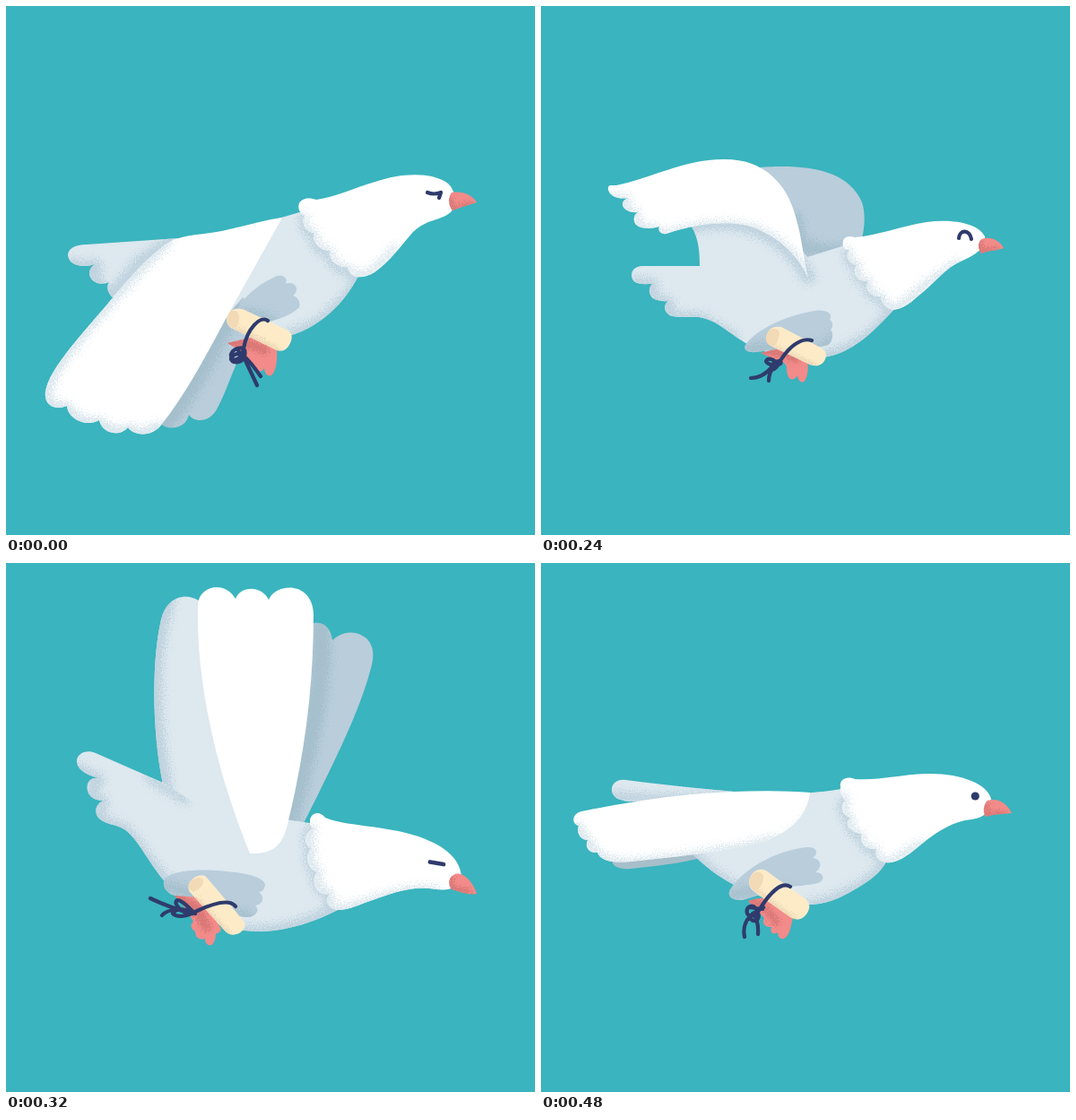
An HTML page that plays this animation: 590x590 px, repeating every 560 ms.

```html
<!DOCTYPE html>
<html lang="en">
<head>
<meta charset="utf-8">
<title>Flying dove</title>
<style>
html, body { margin: 0; width: 100%; height: 100%; overflow: hidden; background: #3ab4be; }
svg { position: absolute; left: 0; top: 0; width: 100%; height: 100%; }
.pose { opacity: 0; will-change: opacity; }
</style>
</head>
<body>
<svg width="590" height="590" aria-hidden="true">
  <defs>
    <!-- soft airbrush edge broken up into fine speckles -->
    <filter id="spray" x="-.15" y="-.15" width="1.3" height="1.3" color-interpolation-filters="sRGB">
      <feGaussianBlur in="SourceGraphic" stdDeviation="3.2" result="soft"/>
      <feTurbulence type="fractalNoise" baseFrequency=".7" numOctaves="1" seed="4" result="noise"/>
      <feDisplacementMap in="soft" in2="noise" scale="28" xChannelSelector="R" yChannelSelector="G"/>
    </filter>
    <filter id="fine" x="-.2" y="-.2" width="1.4" height="1.4" color-interpolation-filters="sRGB">
      <feGaussianBlur in="SourceGraphic" stdDeviation="1.8" result="soft"/>
      <feTurbulence type="fractalNoise" baseFrequency=".7" numOctaves="1" seed="9" result="noise"/>
      <feDisplacementMap in="soft" in2="noise" scale="18" xChannelSelector="R" yChannelSelector="G"/>
    </filter>
  </defs>
</svg>
<script>
const WHITE = '#fff', PALE = '#dde8ef', GREY = '#b9cddb', RED = '#f28b89',
      CREAM = '#fdebc8', CURL = '#f1dab5', NAVY = '#2f3b6c';
const SHADE = { [WHITE]: '#d8e5ec', [PALE]: '#bfd2de', [GREY]: '#a5bfcc', [RED]: '#d97877', [CREAM]: '#edd8b5' };

let clips = 0;

// A filled shape; each shade is [width, path], sprayed inside the outline.
function part(fill, d, ...shades) {
  const body = `<path d="${d}" fill="${fill}"/>`;
  if (!shades.length) return body;
  const id = 'c' + clips++;
  const spray = fill === RED || fill === CREAM ? 'fine' : 'spray';
  const strokes = shades.map(([w, s]) => `<path d="${s}" stroke-width="${w}"/>`).join('');
  return `${body}<clipPath id="${id}"><path d="${d}"/></clipPath>
    <g clip-path="url(#${id})"><g filter="url(#${spray})" fill="none" stroke="${SHADE[fill]}" stroke-linecap="round">
    <path d="${d}" stroke="none"/>${strokes}</g></g>`;
}

const line = (d, w = 4.2) =>
  `<path d="${d}" fill="none" stroke="${NAVY}" stroke-width="${w}" stroke-linecap="round" stroke-linejoin="round"/>`;

const dive = [
  part(PALE, 'M192 259L90 266C76 266 69 271 69 278C70 288 82 293 100 288C91 292 91 302 98 307C104 311 110 310 115 308C111 313 114 321 119 325L150 310Z',
    [14, 'M72 288Q90 294 104 288Q92 300 104 311L116 326L150 285L185 262']),
  part(PALE, 'M300 238L345 225L398 290C380 334 345 361 312 369L240 380L230 350Z',
    [14, 'M396 302C375 340 345 364 300 372'], [10, 'M333 234C330 250 340 255 345 254C340 270 355 276 361 274C360 290 375 293 386 300']),
  part(GREY, 'M264 325L290 345L264 384C254 403 245 432 236 448C228 465 210 465 204 456C201 470 184 474 174 467L200 400Z',
    [26, 'M250 340C228 380 203 430 174 466']),
  part(GREY, 'M256 342C265 322 285 309 300 302C309 298 316 305 311 310C322 306 329 316 320 323C328 326 329 334 326 337C318 345 302 350 290 353L252 352Z',
    [10, 'M255 345Q275 338 300 354']),
  part(RED, 'M247 376L280 368L302 381C303 396 301 408 296 412C291 414 288 408 288 404C284 410 279 408 278 403C270 402 269 394 264 386Z',
    [10, 'M247 376Q272 374 288 384']),
  part(CREAM, 'M264 338L313 361C320 364 320 371 316 378C312 385 306 386 300 383L253 360C246 357 245 350 247 345C249 339 256 336 264 338Z',
    [6, 'M258 361L302 383']),
  part(CURL, 'M249 341C254 338 261 340 260 349C259 357 256 361 252 359C245 355 245 346 249 341Z'),
  line('M292 351C284 345 269 359 265 382C263 392 257 396 253 394C248 389 253 383 259 382C264 380 268 383 266 390C263 400 253 398 251 394C251 389 260 386 264 389L280 423M258 382L264 394M264 389Q273 397 284 413'),
  part(WHITE, 'M308 236C285 239 255 249 228 253C213 255 201 256 189 260C170 267 140 300 111 335C82 369 48 405 44 430C42 446 55 451 68 446C69 461 90 470 104 462C107 477 127 481 136 470C143 480 164 481 174 466C203 430 228 380 250 340Z',
    [11, 'M180 262C145 295 112 334 90 360C65 390 44 415 45 442'], [13, 'M45 445L68 449Q80 468 104 465Q118 480 137 473Q154 482 170 470']),
  part(WHITE, 'M327 220C331 213 340 214 346 216C368 213 390 202 412 196C442 186 475 185 493 198C502 206 503 222 496 230C484 240 470 237 454 252C441 267 427 286 411 297C400 304 384 306 381 291C371 292 360 285 361 273C350 273 340 262 344 253C333 252 329 241 333 234C327 231 325 225 327 220Z',
    [8, 'M333 234Q330 250 344 254Q344 271 361 274Q363 290 380 292Q390 304 408 297L435 270']),
  part(RED, 'M497 208C510 206 520 211 525 219C517 222 507 224 498 228C493 223 493 213 497 208Z', [6, 'M496 216L498 228Q508 223 518 221']),
  line('M470 208Q477 211 485 208L483 214')
];

const glide = [
  part(PALE, 'M240 257C190 253 140 248 95 242C83 240 78 248 79 254C80 262 88 265 98 266L240 266Z',
    [12, 'M82 260Q130 268 230 258']),
  part('#a7bfca', 'M79 331C79 339 88 342 100 341C130 338 160 334 178 329L170 318L80 329Z'),
  part(PALE, 'M290 257C320 255 335 252 348 250L390 320C386 340 370 353 350 364C330 376 315 381 298 381C265 382 205 365 165 320Z',
    [14, 'M166 322Q195 355 222 364'], [13, 'M390 333C365 358 345 372 300 383'],
    [10, 'M338 265Q333 278 345 285Q342 300 357 304Q358 319 374 321Q374 331 388 336']),
  part(GREY, 'M211 364C225 341 262 321 296 317C308 316 310 324 303 329C313 330 314 340 306 345C316 345 317 354 309 357C296 360 285 360 270 362L225 376C212 377 207 371 211 364Z',
    [10, 'M211 371Q240 362 273 365']),
  part(RED, 'M231 377C250 370 262 373 281 395C279 405 277 416 271 419C266 420 264 416 264 412C258 416 255 411 257 406C249 407 246 400 249 396Z',
    [8, 'M235 377Q250 380 262 400']),
  part(CREAM, 'M251 343L294 374C302 380 300 388 294 394C289 399 283 398 278 395L237 366C230 360 231 352 236 346C241 341 247 341 251 343Z',
    [6, 'M242 368L282 397']),
  part(CURL, 'M236 347C240 343 247 344 248 349C249 355 244 363 240 367C231 362 230 353 236 347Z'),
  line('M278 361C268 355 255 368 244 386C240 393 233 396 230 391C228 383 236 380 240 386C243 391 244 396 240 399C234 400 232 395 236 391L248 384M232 384L247 386M237 391C228 397 225 407 227 417M237 391Q243 400 242 414'),
  part(WHITE, 'M300 256C260 253 220 254 180 257C130 261 80 270 45 277C34 280 34 291 42 293C39 302 45 309 52 309C48 318 55 324 63 323C66 332 80 335 100 333C150 328 200 322 235 314C270 306 296 288 300 256Z',
    [10, 'M40 293L51 311L64 326Q78 336 105 335C160 329 220 321 258 309'], [3, 'M260 309Q288 298 298 277']),
  part(WHITE, 'M334 250C332 241 342 237 350 241C375 243 400 236 430 235C467 234 498 246 502 263C503 276 495 284 480 286C460 288 445 298 430 309C415 321 400 336 385 334C375 333 372 325 374 319C362 320 354 311 358 302C344 301 338 290 345 284C335 281 333 270 340 265C336 262 333 256 334 250Z',
    [8, 'M335 258L340 266Q334 279 345 286Q342 300 357 304Q358 319 374 321Q374 333 388 335L425 313']),
  part(RED, 'M498 265C510 261 520 269 525 279C515 280 505 280 496 283C492 278 494 268 498 265Z', [6, 'M497 270L497 282Q506 279 516 280']),
  `<circle cx="484.3" cy="260" r="4.6" fill="${NAVY}"/>`
];

const lift = [
  part(GREY, 'M244 180C300 176 343 184 358 219C363 234 360 252 357 264L340 275L292 282L270 230Z',
    [14, 'M285 264Q320 279 356 270'], [11, 'M285 235L294 280']),
  part(PALE, 'M177 290L112 290C100 291 98 303 105 308C110 311 118 310 124 310C118 316 121 327 130 328Q136 330 142 329C135 334 138 344 147 346C158 348 168 346 176 347C197 350 210 366 232 378C260 392 290 396 320 391C350 385 374 360 395 337L345 265L297 280C270 245 230 235 168 246C176 260 177 275 177 290Z',
    [12, 'M104 308L124 311L126 328L142 331L144 347L178 348L215 370'], [15, 'M395 340C372 368 350 386 312 393'],
    [15, 'M168 246C225 232 270 254 298 302'], [10, 'M343 273Q341 286 352 290Q350 306 364 308Q364 324 379 325Q381 335 392 340']),
  part(GREY, 'M228 378C240 360 275 345 305 340C320 338 326 344 322 350C326 352 326 358 323 361C327 365 325 375 320 378C305 383 270 382 240 386C230 387 225 383 228 378Z',
    [12, 'M228 384Q255 376 280 386'], [8, 'M306 381Q322 380 324 370']),
  part(RED, 'M245 387L270 381L297 395C299 405 297 416 293 419C289 421 286 416 286 412C283 418 276 418 275 411C273 407 276 402 271 398Z',
    [8, 'M247 386Q268 385 284 394']),
  part(CREAM, 'M268 358L312 381C319 385 319 390 316 396C312 402 305 402 300 400L258 380C250 376 250 370 253 364C256 358 262 357 268 358Z',
    [6, 'M262 382L304 401']),
  part(CURL, 'M253 364C257 358 266 359 266 366C265 372 262 379 259 380C250 377 249 370 253 364Z'),
  line('M302 373C289 369 275 382 266 397C262 406 256 408 257 402C261 394 270 395 267 399C262 402 252 400 251 396C254 391 262 395 264 401M259 401C252 410 243 415 234 415M260 402Q254 409 254 418'),
  part(WHITE, 'M75 205C74 199 78 200 84 200C120 193 160 171 203 171C250 170 275 200 284 235C292 262 293 285 298 303C286 278 268 260 240 248C215 238 175 242 140 254C133 255 130 250 132 246C120 250 105 248 104 240C103 235 105 232 108 230C98 231 90 226 91 220Q92 216 97 214C88 216 77 213 75 205Z',
    [8, 'M78 214L96 216L93 228L107 232L107 247L131 249L138 256C175 242 215 240 242 250Q278 266 297 300']),
  part(WHITE, 'M337 268C335 258 342 255 350 258C375 256 400 246 430 241C461 237 488 243 495 257C497 268 488 276 470 284C450 292 440 309 420 324C408 335 396 342 387 337Q379 332 379 324C367 325 360 315 365 307C352 308 346 297 352 289C342 287 339 279 344 272Q338 272 337 268Z',
    [9, 'M342 273Q341 286 352 290Q350 306 364 308Q364 324 379 325Q382 340 398 337L435 307L465 287']),
  part(RED, 'M491 260C502 256 512 262 516 270C508 273 500 272 491 276C487 271 487 264 491 260Z', [6, 'M490 265L491 275Q500 271 508 272']),
  line('M466 259C467 249 478 249 480 260')
];

const raise = [
  part(GREY, 'M340 68C350 64 362 69 364 86C375 76 390 74 402 84C411 93 411 105 406 121C394 165 369 217 332 290L310 290Z',
    [22, 'M350 72C356 130 336 215 314 290']),
  part(PALE, 'M175 247C163 190 162 110 173 63C179 38 200 32 215 42L275 310L210 300Z',
    [18, 'M180 40C158 100 163 190 177 250'], [8, 'M175 250Q182 275 215 290']),
  part(PALE, 'M175 245L100 212C88 207 78 214 79 222C80 230 88 236 104 240C92 238 88 248 92 257C96 264 104 265 109 265C100 268 98 278 103 284C110 292 122 291 132 297C150 310 160 338 180 358C210 395 240 411 285 411C315 410 345 400 372 386L352 292L312 286L262 290L205 264Z',
    [12, 'M80 229L103 242L93 258L108 267L103 285L134 298Q155 325 180 358'], [15, 'M260 411C305 416 340 402 375 384'],
    [10, 'M160 240L200 264'], [10, 'M341 296Q332 308 340 319Q334 336 346 345Q342 362 360 370L360 383']),
  part(WHITE, 'M214 45C217 24 245 20 256 40C262 25 285 25 293 41C301 22 341 20 343 56C343 130 335 205 315 287C310 312 301 325 272 324C245 258 211 150 214 45Z'),
  part(GREY, 'M176 355C178 345 205 341 235 343C265 345 288 350 289 359Q288 366 282 367C289 372 287 381 278 382C283 386 280 394 270 395C255 396 220 380 185 370C178 366 175 361 176 355Z',
    [12, 'M177 360Q210 368 240 386L272 396']),
  part(RED, 'M188 371L218 373L240 408Q238 414 234 413C234 422 230 428 226 426Q222 425 222 419C216 421 211 418 211 411C206 408 205 403 209 400L200 385Z',
    [11, 'M190 373L211 384L224 406']),
  part(CREAM, 'M224 351L264 398C269 404 266 409 260 413C253 416 248 415 243 409L206 368C201 362 204 355 210 351C215 348 221 347 224 351Z',
    [6, 'M212 375L248 414']),
  part(CURL, 'M205 357C209 350 218 349 220 354C221 360 214 365 209 367C203 364 203 360 205 357Z'),
  line('M256 383C250 375 235 378 213 388C203 394 191 396 186 391C190 383 207 387 211 391C204 385 197 376 191 376C186 379 194 388 203 391M161 374Q184 385 208 391M174 393Q179 387 190 387'),
  part(WHITE, 'M339 290C338 279 349 275 356 284C380 294 420 292 460 305C494 317 506 332 508 349C506 362 495 366 480 364C450 359 430 369 400 379C385 385 369 391 361 383Q355 376 361 369C349 372 338 358 347 344C337 343 333 328 340 318C331 313 333 300 343 296Q339 294 339 290Z',
    [10, 'M341 296Q333 308 340 319Q335 336 347 345Q342 362 360 370Q358 386 375 387C415 377 440 361 480 366']),
  part(RED, 'M499 348C508 342 521 355 525 369C515 371 505 366 497 364C492 358 494 351 499 348Z', [6, 'M497 352L497 363Q507 364 517 368']),
  line('M473 333.5L488 336', 4.8)
];

// [pose, time on stage in ms]
const steps = [[dive, 160], [glide, 80], [lift, 80], [raise, 80], [lift, 80], [glide, 80]];
const loop = steps.reduce((sum, s) => sum + s[1], 0);

const shows = [dive, glide, lift, raise].map(pose => {
  const svg = document.createElementNS('http://www.w3.org/2000/svg', 'svg');
  svg.setAttribute('viewBox', '0 0 590 590');
  svg.setAttribute('class', 'pose');
  svg.innerHTML = pose.join('');
  document.body.append(svg);

  let at = 0;
  const frames = steps.map(([p, ms]) => {
    const frame = { offset: at / loop, opacity: p === pose ? 1 : 0, easing: 'steps(1, end)' };
    at += ms;
    return frame;
  });
  frames.push({ offset: 1, opacity: frames[0].opacity });
  return svg.animate(frames, { duration: loop, iterations: Infinity });
});
shows.forEach(show => { show.startTime = 0; });
</script>
</body>
</html>
```
